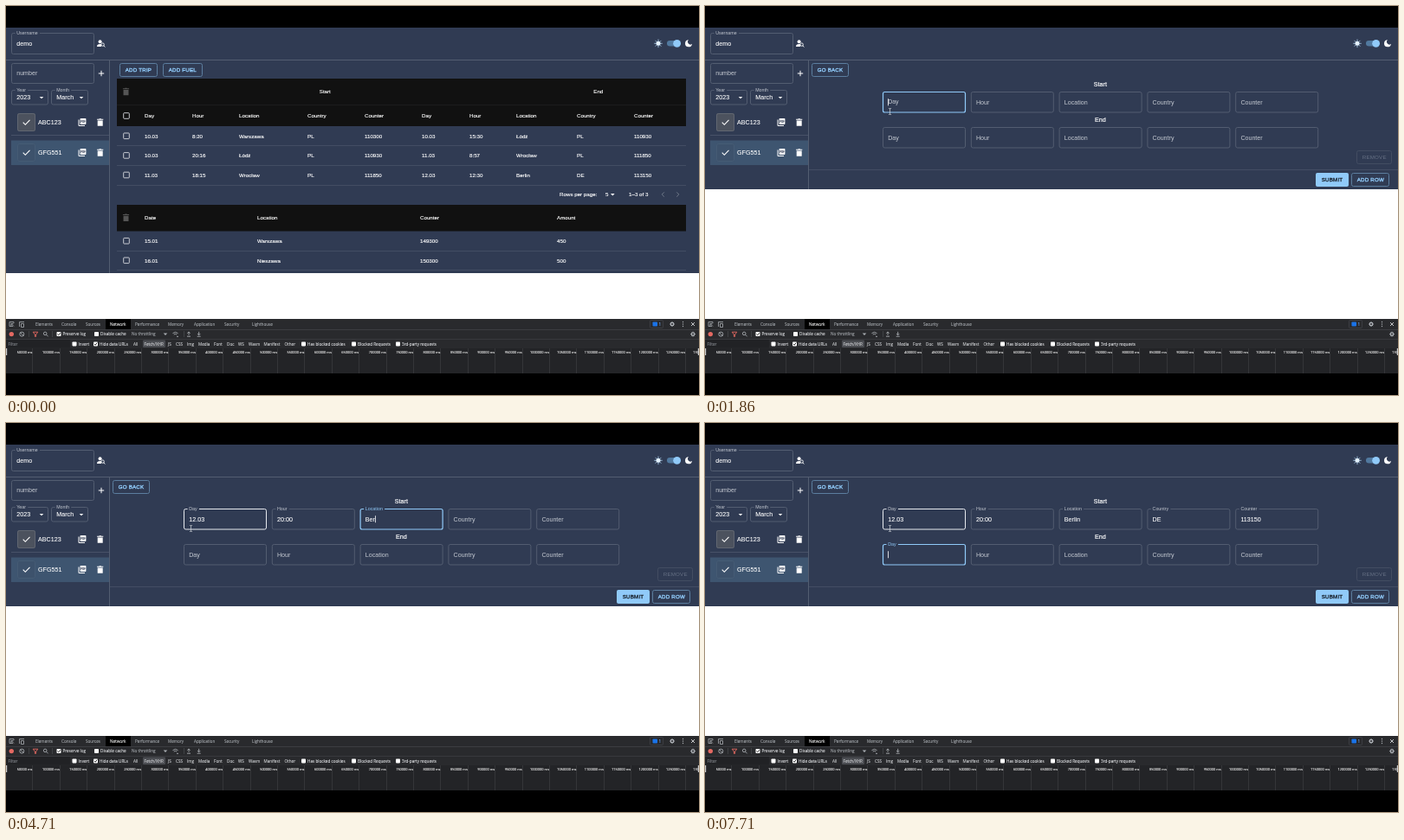
Recreate the animation shown at these times as an HTML page with a canvas. Size 800 px wide and 450 px high, loop 8 s.

```html
<!DOCTYPE html>
<html lang="en">
<head>
<meta charset="utf-8">
<title>Trip form</title>
<style>
html, body { margin: 0; height: 100%; overflow: hidden; background: #000; }
canvas { display: block; }
</style>
</head>
<body>
<canvas id="stage" width="800" height="450"></canvas>
<script>
const ctx = document.getElementById('stage').getContext('2d');
const LOOP = 8000, STEP = 1000 / 7, BLINK = 265, FORM_AT = 850;
const UI = '"Liberation Sans", Arial, sans-serif', TOOLS = '"Open Sans", "Noto Sans", sans-serif';
const BLUE = '#90caf9', PAGE = '#303b53', LINE = '#535d71', SOFT = '#c5cad2', GREY = '#a9adb2';

// ---------- helpers ----------
function fill(x, y, w, h, color, r = 0) {
  ctx.fillStyle = color;
  ctx.beginPath();
  ctx.roundRect(x, y, w, h, r);
  ctx.fill();
}
function frame(x, y, w, h, color, r = 2, width = 1) {
  ctx.strokeStyle = color;
  ctx.lineWidth = width;
  ctx.beginPath();
  ctx.roundRect(x, y, w, h, r);
  ctx.stroke();
}
function path(d, x, y, color, width = 0) {
  ctx.save();
  ctx.translate(x, y);
  const p = new Path2D(d);
  if (width) {
    ctx.strokeStyle = color;
    ctx.lineWidth = width;
    ctx.stroke(p);
  } else {
    ctx.fillStyle = color;
    ctx.fill(p);
  }
  ctx.restore();
}
function text(s, x, y, { size = 6.2, color = '#fff', font = UI, align = 'left', bold = .15, gap = 0 } = {}) {
  ctx.font = `${size}px ${font}`;
  ctx.textAlign = align;
  ctx.letterSpacing = gap + 'px';
  ctx.fillStyle = ctx.strokeStyle = color;
  ctx.lineWidth = bold;
  ctx.fillText(s, x, y);
  if (bold) ctx.strokeText(s, x, y);
  return ctx.measureText(s).width;
}
function dot(x, y, r, color) {
  ctx.fillStyle = color;
  ctx.beginPath();
  ctx.arc(x, y, r, 0, 7);
  ctx.fill();
}

// ---------- widgets ----------
const trash = (x, y, color) => path('M-3 -2.2H3V4H-3ZM-3.6 -4H-1.4L-1 -4.6H1L1.4 -4H3.6V-3H-3.6Z', x, y, color);
const caretDown = (x, y, color = '#fff') => path('M-2.3 -1.1H2.3L0 1.3Z', x, y, color);
const checkbox = (x, y) => frame(x - 3.3, y - 3.3, 6.6, 6.6, '#d8dbe0', .8, .9);

function button(label, x, y, w, { hot, off, solid } = {}) {
  if (solid) fill(x, y, w, 16, BLUE, 2);
  else {
    if (hot) fill(x, y, w, 15.5, '#90caf914', 2);
    frame(x + .5, y + .5, w - 1, 15, off ? '#434d62' : hot ? '#8cc3f0' : '#5c7e9f');
  }
  text(label, x + 6.8, y + 10.3, {
    color: solid ? '#1c2733' : off ? '#667084' : BLUE, bold: off ? 0 : .35, gap: .18
  });
}

// Outlined field; lift runs from 0 (label inside) to 1 (label on the border).
function field(label, x, y, w, h, { value = '', lift = 0, focus, hover, caret } = {}) {
  frame(x, y, w, h, focus ? BLUE : hover ? '#e6e9ee' : LINE, 2, focus ? 1.2 : 1);
  const size = 7.1 - 1.8 * lift, tint = focus && lift > .5 ? BLUE : SOFT;
  if (lift === 1) {
    ctx.font = `${size}px ${UI}`;
    ctx.letterSpacing = '0px';
    fill(x + 4, y - 1, ctx.measureText(label).width + 4, 2, PAGE);
  }
  text(label, x + 5.7, y + h / 2 + 2.4 - lift * (h / 2 + .7), { size, color: tint, bold: 0 });
  const width = text(value, x + 5.7, y + h / 2 + 2.4, { size: 7.1, bold: .1, gap: .05 });
  if (caret) fill(x + 5.7 + width, y + h / 2 - 4, .8, 8, '#fff');
}

function header(bottom) {
  fill(0, 25, 800, bottom - 25, PAGE);
  fill(0, 62, 800, 1, LINE);
  fill(119, 62, 1, bottom - 62, LINE);
  field('Username', 6.5, 31.5, 95, 24, { value: 'demo', lift: 1 });
  dot(108.6, 41.3, 2, '#fff');
  path('M105 47C105 43.500 109 43.800 110 44.200L110 47Z', 0, 0, '#fff');
  path('M113.300 44.600A1.700 1.700 0 1 0 109.900 44.600A1.700 1.700 0 1 0 113.300 44.600M112.800 45.800L114.300 47.500', 0, 0, '#fff', .9);
  path('M0 -4.800V4.800M-4.800 0H4.800M-3.400 -3.400L3.400 3.400M-3.400 3.400L3.400 -3.400', 753, 43.300, '#a9cdea', .8);
  dot(753, 43.3, 2.5, '#e4f2ff');
  fill(763, 40, 15.5, 6.6, '#51799f', 3.3);
  dot(774.6, 43.3, 4.4, BLUE);
  path('M0 -4A4 4 0 1 0 4 .4A2.700 2.700 0 0 1 0 -4Z', 788, 43.300, '#fff');
}

function vehicle(name, y, selected) {
  if (selected) fill(6, y - 14, 113, 28.5, '#3e5570');
  fill(13, y - 10.5, 21, 21, selected ? '#3d526c' : '#4c525e', 2);
  frame(13.5, y - 10, 20, 20, selected ? '#4a6079' : '#6b707a', 2, .7);
  path('M-3.800 .2L-1.200 2.800L4 -2.600', 23.500, y, '#fff', 1.100);
  text(name, 37, y + 2.500, { size: 7.1, bold: .1, gap: .03 });
  fill(85.6, y - 4.400, 6.800, 6.800, '#fff', .7);
  path('M84 -3V4H91', 0, y, '#fff', 1);
  text('PDF', 89, y + .2, { size: 2.800, color: PAGE, align: 'center' });
  trash(108.700, y + .3, '#fff');
}

function sidebar() {
  field('number', 6.5, 66.5, 95, 23, {});
  path('M-3.200 0H3.200M0 -3.200V3.200', 110, 78, '#fff', 1);
  field('Year', 6.5, 97.5, 42, 16.500, { value: '2023', lift: 1 });
  field('Month', 52.5, 97.5, 42, 16.500, { value: 'March', lift: 1 });
  caretDown(41, 106);
  caretDown(87, 106);
  vehicle('ABC123', 134.5);
  fill(6, 149, 113, 1, '#485268');
  vehicle('GFG551', 169.5, true);
}

// ---------- list view ----------
const TRIP_X = [160, 215, 269, 348, 414, 480, 535, 589, 659, 725];
const TRIPS = [
  '10.03|8:20|Warszawa|PL|110300|10.03|15:30|Łódź|PL|110930',
  '10.03|20:16|Łódź|PL|110930|11.03|8:57|Wrocław|PL|111850',
  '11.03|18:15|Wrocław|PL|111850|12.03|12:30|Berlin|DE|113150'
];
const FUEL_X = [160, 290, 478, 636];
const FUEL = ['15.01|Warszawa|149300|450', '16.01|Nieszawa|150300|500'];

function cells(row, xs, y) {
  row.split('|').forEach((s, i) => text(s, xs[i], y + 2.2));
}
function rows(list, xs, top) {
  list.forEach((row, i) => {
    const y = top + i * 22.6;
    checkbox(139, y);
    cells(row, xs, y);
    fill(128, Math.round(y + 11), 657, 1, '#434d63');
  });
}

function listView(hot) {
  header(309);
  sidebar();
  button('ADD TRIP', 131, 66, 44, { hot });
  button('ADD FUEL', 181, 66, 46);
  fill(128, 84, 657, 55, '#111');
  fill(128, 114, 657, 1, '#1c1c1d');
  trash(138.5, 99.3, '#555');
  text('Start', 368.3, 101.3, { align: 'center' });
  text('End', 683.8, 101.3, { align: 'center' });
  checkbox(139, 127);
  cells('Day|Hour|Location|Country|Counter|Day|Hour|Location|Country|Counter', TRIP_X, 127);
  ctx.save();
  ctx.beginPath();
  ctx.rect(0, 25, 800, 284);
  ctx.clip();
  rows(TRIPS, TRIP_X, 150.3);
  text('Rows per page:', 639, 220.2);
  text('5', 692, 220.2);
  caretDown(700.3, 218.2);
  text('1–3 of 3', 719, 220.2);
  path('M1.300 -2.600L-1.300 0L1.300 2.600', 758.5, 218, '#76808f', .9);
  path('M-1.300 -2.600L1.300 0L-1.300 2.600', 775.5, 218, '#76808f', .9);
  fill(128, 230, 657, 30.5, '#111');
  trash(138.5, 245, '#555');
  cells('Date|Location|Counter|Amount', FUEL_X, 245);
  rows(FUEL, FUEL_X, 271.7);
  ctx.restore();
}

// ---------- form view ----------
const LABELS = ['Day', 'Hour', 'Location', 'Country', 'Counter'];
const ENTRIES = [
  { focus: 1850, value: '12.03', keys: [1990, 2135, 2275, 2420, 2560] },
  { focus: 2680, value: '20:00', keys: [3280, 3420, 3565, 3710, 3850] },
  { focus: 4130, value: 'Berlin', keys: [4420, 4565, 4706, 4980, 4985, 4990] },
  { focus: 5130, value: 'DE', keys: [5280, 5420] },
  { focus: 5560, value: '113150', keys: [6135, 6280, 6420, 6565, 6705, 6850] },
  { focus: 7130, value: '', keys: [] }
];

function formView(t, mouse) {
  header(212);
  sidebar();
  button('GO BACK', 123, 66, 43, { hot: t < 1000 });
  text('Start', 456.3, 93.4, { size: 7.1, align: 'center', bold: .2, gap: .07 });
  text('End', 456.3, 134.3, { size: 7.1, align: 'center', bold: .2, gap: .07 });
  for (let i = 0; i < 10; i++) {
    const x = 205.5 + (i % 5) * 101.8, y = i < 5 ? 99.5 : 140.5;
    const state = { hover: i === 0 && mouse.x > 205 && mouse.y > 99 };
    const entry = ENTRIES[i];
    if (entry && t >= entry.focus) {
      const next = ENTRIES[i + 1], typed = entry.keys.filter(k => k <= t);
      const last = typed.at(-1) || entry.focus;
      state.lift = Math.min(1, (t - entry.focus) / 100);
      state.value = entry.value.slice(0, typed.length);
      state.focus = !next || t < next.focus;
      state.caret = state.focus && Math.floor((t - last) / BLINK) % 2 === 0;
    }
    field(LABELS[i % 5], x, y, 95, 23.5, state);
  }
  button('REMOVE', 752, 167, 41, { off: true });
  fill(120, 189, 680, 1, '#434d63');
  button('SUBMIT', 705, 193, 38, { solid: true });
  button('ADD ROW', 746, 193, 44);
}

// ---------- developer tools ----------
function tool(s, x, y, color = GREY, size = 4.65) {
  text(s, x, y, { size, color, font: TOOLS, bold: .08 });
}
function option(s, x, y, checked) {
  fill(x, y - 4.3, 5, 5, '#fff', .8);
  if (checked) path('M1 2.500L2.200 3.800L4.200 1.200', x, y - 4.300, '#222', .9);
  tool(s, x + 7, y, '#e3e5e8');
}
const gear = (x, y) => {
  path('M0 -3V3M-3 0H3M-2.100 -2.100L2.100 2.100M-2.100 2.100L2.100 -2.100', x, y, GREY, 1);
  dot(x, y, 2.2, GREY);
  dot(x, y, 1, '#292a2d');
};

function devTools() {
  fill(0, 362, 800, 63, '#292a2d');
  fill(0, 374, 800, 1, '#3c3d41');
  fill(0, 385, 800, 1, '#38393d');
  fill(115, 362, 29, 12, '#000');
  path('M8 370.500H4V365.500H9V367M6 367.500L9 370.500M6 370V367.500H8.500', 0, 0, GREY, .8);
  path('M15.500 371V365.500H21M17.500 367.500H20.500V371.500H17.500Z', 0, 0, GREY, .8);
  const tabs = { Elements: 34, Console: 64, Sources: 92, Network: 120, Performance: 149,
    Memory: 187, Application: 217, Security: 252, Lighthouse: 284 };
  for (const [name, x] of Object.entries(tabs)) tool(name, x, 370, name === 'Network' ? '#fff' : GREY);
  frame(743.5, 363.5, 15, 9, '#45474c', 1, .7);
  fill(746.5, 365.5, 5.5, 5, '#1a73e8', .8);
  tool('1', 753.5, 370, '#7cacf8');
  gear(769, 368);
  for (const y of [365.5, 368, 370.5]) dot(781.5, y, .7, GREY);
  path('M-2 -2L2 2M-2 2L2 -2', 793, 368, '#d5d7da', .9);

  dot(6.3, 379.6, 2.7, '#e46962');
  path('M2.500 0A2.500 2.500 0 1 0 -2.500 0A2.500 2.500 0 1 0 2.500 0M-1.800 -1.800L1.800 1.800', 18.300, 379.600, GREY, .9);
  path('M-2.800 -2.600H2.800L.6 .2V2.600H-.6V.2Z', 34, 379.800, '#e46962', .9);
  path('M1 -.7A1.800 1.800 0 1 0 -2.600 -.7A1.800 1.800 0 1 0 1 -.7M.5 .6L2.600 2.700', 46, 379.600, GREY, .9);
  for (const x of [26, 53, 205]) fill(x, 376, .7, 7, '#494c50');
  option('Preserve log', 58.5, 381.3, true);
  option('Disable cache', 102, 381.3);
  tool('No throttling', 145, 381.3);
  caretDown(184, 379.6, GREY);
  path('M-3 -1Q0 -3.600 3 -1M-1.700 .5Q0 -1 1.700 .5M1.500 2.800H3.500', 195.500, 379.600, GREY, .9);
  path('M0 1V-2.600M-1.600 -1L0 -2.700L1.600 -1M-2 2.600H2', 211, 379.600, GREY, .9);
  path('M0 -2.800V1M-1.600 -.6L0 1.100L1.600 -.6M-2 2.600H2', 222.700, 379.600, GREY, .9);
  gear(793, 379.6);

  fill(0, 386, 74, 9.5, '#212225');
  tool('Filter', 2.5, 392.7, '#85898e');
  option('Invert', 76.5, 392.7);
  option('Hide data URLs', 101, 392.7, true);
  fill(158, 386.5, 26, 8.5, '#4b4d52', 1);
  const kinds = { All: 147, 'Fetch/XHR': 159.5, JS: 187, CSS: 196, Img: 209, Media: 222, Font: 240,
    Doc: 255, WS: 268, Wasm: 280, Manifest: 297.5, Other: 321.5 };
  for (const [name, x] of Object.entries(kinds)) tool(name, x, 392.7, '#d5d7da');
  option('Has blocked cookies', 341, 392.7);
  option('Blocked Requests', 399, 392.7);
  option('3rd-party requests', 450, 392.7);

  fill(0, 396, 800, 29, '#232427');
  for (let i = 1; i <= 26; i++) {
    const x = i * 31.4;
    fill(Math.round(x) - 1, 396, 1, 29, '#343538');
    text(i * 50000 + ' ms', x - 1, 402.3, { size: 3.9, font: TOOLS, align: 'right', bold: .1, color: '#f0f0f0' });
  }
  fill(0, 396, 1.2, 8, '#ccc');
  fill(798.8, 396, 1.2, 8, '#ccc');
}

// ---------- pointer ----------
const ROUTE = [[140, 250, 430], [560, 150, 78], [720, 149.5, 76.5], [857, 155.5, 90], [1430, 213.5, 122]];

function pointer(t) {
  const i = ROUTE.findIndex(p => p[0] > t);
  if (i < 0) return { x: 213.5, y: 122 };
  if (!i) return { x: -50, y: -50 };
  const [a, b] = [ROUTE[i - 1], ROUTE[i]], s = (t - a[0]) / (b[0] - a[0]), e = s * s * (3 - 2 * s);
  return { x: a[1] + (b[1] - a[1]) * e, y: a[2] + (b[2] - a[2]) * e };
}
function drawPointer({ x, y }, hand, beam) {
  if (hand || !beam) {
    const d = hand
      ? 'M.6 .6Q1.500 -.3 2.200 .7V3.600L5 4.300Q5.800 4.600 5.600 5.800L4.900 9.500H1.500L-1.300 5.800Q-1 4.700 .6 6Z'
      : 'M0 0V7.300L1.700 5.700L2.900 8.300L4.100 7.700L3 5.200H5.200Z';
    path(d, x, y, '#111', 1);
    path(d, x, y, '#fff');
  } else {
    path('M-1.500 -3.500H-.4L0 -3.100L.4 -3.500H1.500M0 -3.200V3.200M-1.500 3.500H-.4L0 3.100L.4 3.500H1.500', x, y, '#d0d4da', .7);
  }
}

function draw(now) {
  const t = Math.floor((now % LOOP + 5) / STEP) * STEP;
  const mouse = pointer(t), form = t >= FORM_AT;
  const hand = !form && mouse.y > 66 && mouse.y < 82;
  fill(0, 0, 800, 450, '#000');
  fill(0, 200, 800, 162, '#fff');
  if (form) formView(t, mouse);
  else listView(hand);
  devTools();
  fill(0, 425, 800, 25, '#000');
  drawPointer(mouse, hand, form && mouse.x > 205 && mouse.y > 99);
  requestAnimationFrame(tick);
}
const start = performance.now();
function tick() { draw(performance.now() - start); }
tick();
</script>
</body>
</html>
```
